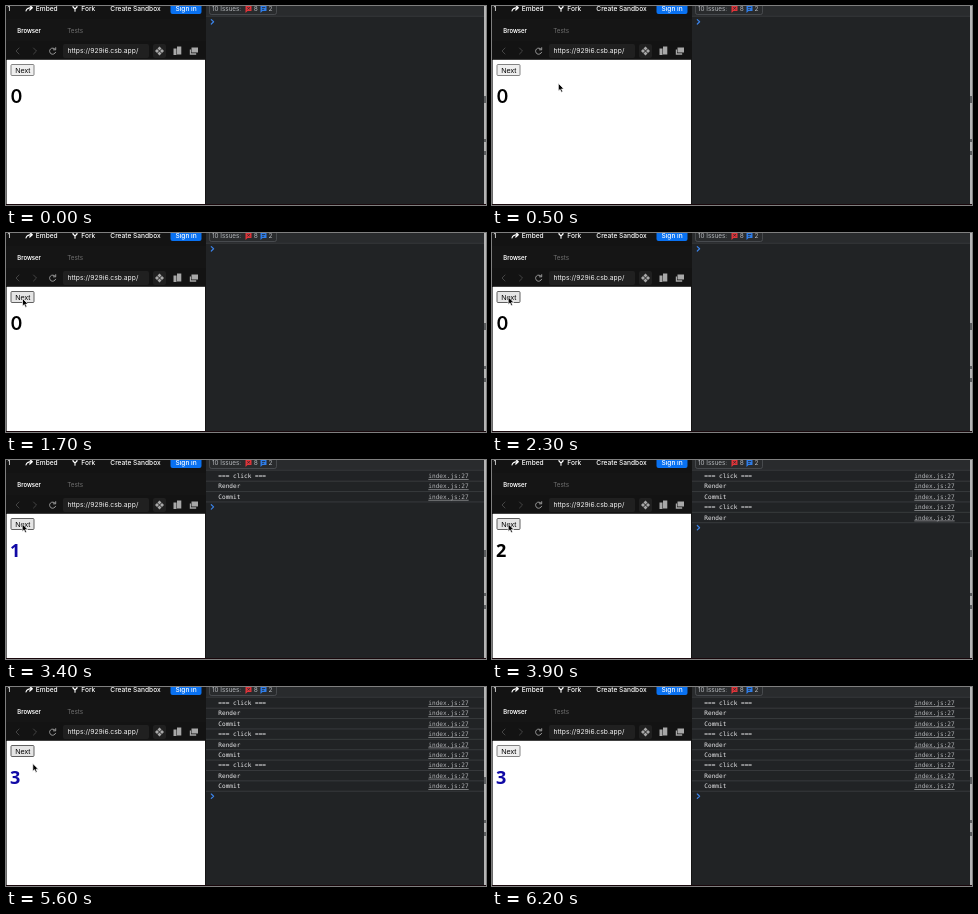
An HTML page that plays this animation: 480x199 px, repeating every 6400 ms.

```html
<!DOCTYPE html>
<html lang="en">
<head>
<meta charset="utf-8">
<title>Click counter and console</title>
<style>
  html, body { margin: 0; width: 100%; height: 100%; overflow: hidden; background: #000; }
  svg { display: block; width: 480px; height: 199px; }
  text { white-space: pre; }
  .ui { font-family: Inter, sans-serif; font-size: 6.6px; fill: #fff; }
  .mid { font-weight: 500; }
  .mono { font-family: "DejaVu Sans Mono", monospace; font-size: 6.1px; fill: #ececee; }
  .link { fill: #b4b6b9; text-decoration: underline; }
  .icon { fill: none; stroke-linecap: round; stroke-linejoin: round; }
</style>
</head>
<body>
<svg viewBox="0 0 480 199" xmlns="http://www.w3.org/2000/svg">
  <rect width="480" height="199" fill="#151515"/>

  <!-- sandbox toolbar -->
  <rect width="200" height="13" fill="#131313"/>
  <g class="ui mid">
    <text x="1.5" y="4.6">1</text>
    <text x="29.8" y="4.6">Embed</text>
    <text x="75.3" y="4.6">Fork</text>
    <text x="104.3" y="4.6">Create Sandbox</text>
    <path d="M164.500 -1H195.500V6a2 2 0 0 1 -2 2H166.500a2 2 0 0 1 -2 -2Z" fill="#0971f1"/>
    <text x="169.4" y="4.6">Sign in</text>
  </g>
  <path class="icon" d="M20 5C20.500 2.500 22.500 1.700 26 1.700M23.800 -.5L26.300 1.700L23.800 4" stroke="#fff" stroke-width="1.2"/>
  <path class="icon" d="M67 -.5V1L69 3L71 1V-.5M69 3V5.300" stroke="#fff" stroke-width="1.1"/>

  <!-- tabs and address row -->
  <text class="ui" x="11.300" y="27.400" font-weight="600" style="font-size:5.9px">Browser</text>
  <text class="ui" x="61.300" y="27.400" style="font-size:6.3px;fill:#707070">Tests</text>
  <rect y="35.500" width="200" height="18.500" fill="#131313"/>
  <rect x="57" y="38" width="86" height="14" rx="2" fill="#202020"/>
  <rect x="147" y="38" width="13" height="14" rx="2" fill="#202020"/>
  <text class="ui" x="61.400" y="47" style="font-size:6.75px;fill:#f2f2f2">https://929i6.csb.app/</text>
  <g class="icon" stroke="#444">
    <path d="M13 42L10 45L13 48M27.500 42L30.500 45L27.500 48"/>
    <path d="M49.200 43.300A3.100 3.100 0 1 0 49.600 46.300M49.700 41.700V43.800H47.500" stroke="#999"/>
  </g>
  <g fill="#a8a8a8">
    <path d="M153.500 40.500l2 2-2 2-2-2ZM153.500 45.500l2 2-2 2-2-2ZM151 43l2 2-2 2-2-2ZM156 43l2 2-2 2-2-2Z"/>
    <path d="M167.500 42.500h3v6.500h-3ZM171 40.500h4.300v8h-4.300Z"/>
    <path d="M185.500 41.500h6.500v5h-6.500ZM183.800 43.500h1.200v3.800h5.200v1.500h-6.400Z"/>
  </g>

  <!-- page -->
  <rect y="54" width="1" height="144" fill="#6a6a6a"/>
  <rect x="1" y="53.800" width="198" height="144.200" fill="#fff"/>
  <rect id="btn" x="5" y="58.500" width="23" height="11" rx="1" stroke-width=".9"/>
  <text x="9.200" y="66.500" font-family="Liberation Sans, sans-serif" font-size="7.300">Next</text>
  <text id="count" y="97" font-size="18"></text>

  <!-- console -->
  <rect x="200" width="278" height="198" fill="#212325"/>
  <rect x="200" width="278" height="10" fill="#292b2d"/>
  <path d="M200 10.300H478" stroke="#3d4043" stroke-width=".7"/>
  <path d="M203.500 -1V6.500a2 2 0 0 0 2 2H268.500a2 2 0 0 0 2 -2V-1" fill="none" stroke="#55585c" stroke-width=".7"/>
  <g class="ui" style="fill:#b4b7bb">
    <text x="206" y="5" style="font-size:6.300px">10 Issues:</text>
    <text x="247.800" y="5">8</text>
    <text x="262.600" y="5">2</text>
  </g>
  <path d="M239.500 -.5h6v5.500h-4l-2 2Z" fill="#e0353a"/>
  <path d="M254.500 -.5h6v5.500h-4l-2 2Z" fill="#2f7de8"/>
  <path d="M241.300 1l2.600 2.600M243.900 1l-2.600 2.600M256 1.500h3.200M256 3.300h2.200" stroke="#22262b" stroke-width=".8"/>
  <g id="log"></g>
  <path id="prompt" class="icon" d="M205.300 -2.200L207.600 0L205.300 2.200" stroke="#3b82e6" stroke-width="1.2"/>

  <!-- window edges -->
  <rect x="478" width="2" height="198" fill="#b4b4b4"/>
  <path d="M479 90v7M479 133v3M479 145v4" stroke="#5c5e60" stroke-width="2"/>
  <rect y="198" width="480" height="1" fill="#18070b"/>

  <g id="ring" fill="none">
    <circle cx="16.200" cy="63.700" r="12.300" stroke="#aaa" stroke-opacity=".5" stroke-width="1.800"/>
    <circle cx="16.200" cy="63.700" r="11.800" stroke="#1c1c1c" stroke-width="1.200"/>
  </g>
  <path id="cursor" d="M0 0V7.700L1.800 6.100L3 8.900L4.400 8.300L3.200 5.600H5.600Z" fill="#000" stroke="#fff" stroke-width=".7" stroke-linejoin="round"/>
</svg>
<script>
  const LOOP = 6400, STEP = 100, ROW = 10.38, TOP = 16;
  const $ = id => document.getElementById(id);
  const log = $("log"), count = $("count"), btn = $("btn");

  // ring start, render time, commit time
  const clicks = [[2500, 2700, 2700], [3600, 3800, 4000], [5100, 5300, 5400]];
  const lines = clicks.flatMap(([, render, commit]) => [
    ["=== click ===", render], ["Render", render], ["Commit", commit]
  ]);

  // cursor stops: time, x, y
  const path = [
    [0, 138, 202], [100, 130, 186], [400, 76, 92], [700, 47, 48], [900, 45.2, 45.2],
    [1100, 45.2, 45.2], [1400, 25, 57], [1700, 16.500, 65.5], [1800, 16.2, 63.8],
    [5500, 16.2, 63.8], [5800, 48, 102], [6100, 112, 188], [6200, 122, 204], [6400, 138, 204]
  ];

  const rows = lines.map(([label, at], i) => {
    const g = document.createElementNS("http://www.w3.org/2000/svg", "g");
    const y = TOP + i * ROW;
    g.innerHTML =
      `<text class="mono" x="212.300" y="${y + 2.1}">${label}</text>` +
      `<text class="mono link" x="422.300" y="${y + 2.1}">index.js:27</text>` +
      `<path d="M200 ${y + ROW / 2}H478" stroke="#414447" stroke-width=".7"/>`;
    log.append(g);
    return { g, at };
  });

  function place(t) {
    let i = 0;
    while (i < path.length - 2 && path[i + 1][0] <= t) i++;
    const [a, x, y] = path[i], [b, u, v] = path[i + 1];
    const k = (t - a) / (b - a);
    return [x + (u - x) * k, y + (v - y) * k];
  }

  const show = (el, on) => el.setAttribute("visibility", on ? "visible" : "hidden");

  function set(el, attrs) {
    for (const key in attrs) el.setAttribute(key, attrs[key]);
  }

  function draw(time) {
    const t = Math.floor((time % LOOP) / STEP) * STEP;
    const n = clicks.filter(c => t >= c[1]).length;
    const pressed = clicks.some(c => t >= c[0] && t < c[1]);
    const hover = t >= 1500 && t < 5700;

    rows.forEach(r => show(r.g, t >= r.at));
    const used = rows.filter(r => t >= r.at).length;
    set($("prompt"), { transform: `translate(0 ${TOP + used * ROW - .2})` });

    count.textContent = n;
    set(count, {
      x: n ? 4 : 4.6,
      fill: n % 2 ? "#1009a5" : "#000",
      "font-family": n ? "Open Sans, sans-serif" : "Inter, sans-serif",
      "font-weight": n ? 700 : 600
    });

    set(btn, {
      fill: pressed ? "#f5f5f5" : hover ? "#e5e5e5" : "#efefef",
      stroke: pressed ? "#a0a0a0" : hover ? "#505050" : "#767676"
    });
    show($("ring"), pressed);

    const [x, y] = place(t);
    set($("cursor"), { transform: `translate(${x} ${y})` });
  }

  const start = performance.now();
  function tick() {
    draw(performance.now() - start);
    requestAnimationFrame(tick);
  }
  tick();
</script>
</body>
</html>
```
